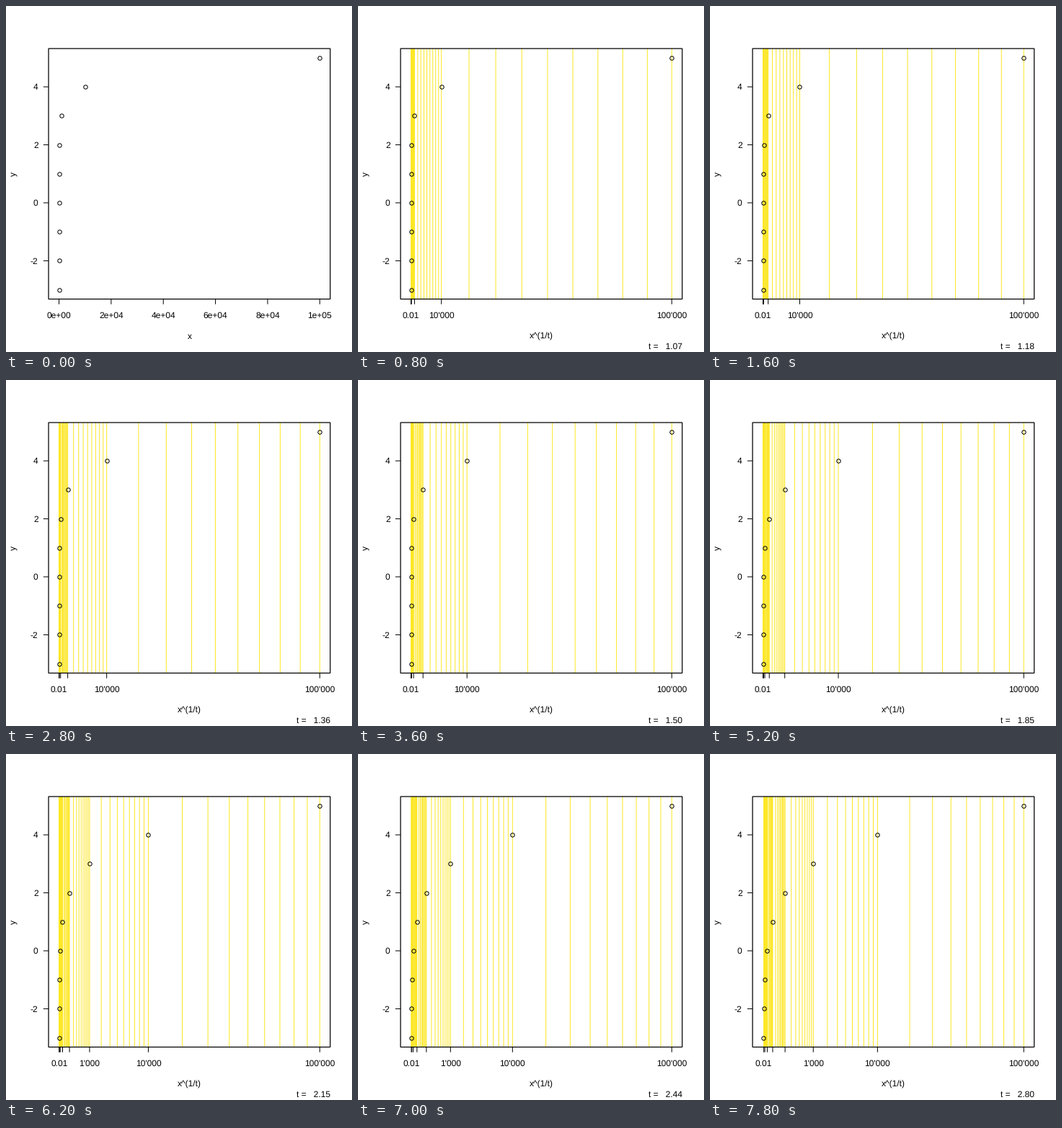
These frames come from a looping animation (480 by 480 pixels, 8000 ms). A matplotlib script:

```python
import numpy as np
import matplotlib
import matplotlib.pyplot as plt
from matplotlib.animation import FuncAnimation
from matplotlib.collections import LineCollection
from matplotlib.patches import Rectangle

SIZE, DPI = 480, 100
PX = 72 / DPI
FRAMES, STEP = 40, 200
LEFT, RIGHT, TOP, BOTTOM = 59.04, 449.76, 59.04, 406.56
TICK = 7.2
YELLOW = "#fde725"

matplotlib.rcParams.update({
    "font.family": "Liberation Sans",
    "font.size": 12 * PX,
    "text.hinting": "none",
    "path.snap": False,
    "axes.unicode_minus": False,
})

fig = plt.figure(figsize=(SIZE / DPI, SIZE / DPI), dpi=DPI, facecolor="white")
ax = fig.add_axes([0, 0, 1, 1])
ax.set_xlim(0, SIZE)
ax.set_ylim(SIZE, 0)
ax.axis("off")


def to_x(u):
    """Pixel column of u in 0..1, with a 4% margin on both sides."""
    return LEFT + (RIGHT - LEFT) * (u + 0.04) / 1.08


def to_y(v):
    return BOTTOM - (BOTTOM - TOP) * ((v + 3) / 8 + 0.04) / 1.08


def text(x, y, s="", ha="center", va="baseline", **kw):
    return ax.text(x, y, s, ha=ha, va=va, color="black", **kw)


def segments(color, width, z):
    lines = LineCollection([], colors=color, linewidths=width * PX, zorder=z)
    ax.add_collection(lines, autolim=False)
    return lines


def vertical(xs, y0, y1):
    return [[(x, y0), (x, y1)] for x in xs]


def text_width(s):
    return sum({"'": 2.29, ".": 3.33}.get(c, 6.67) for c in s)


exponents = np.arange(-3, 6)
decades = 10.0 ** np.arange(-2, 6)
names = ["0.01", "0.1", "1", "10", "100", "1'000", "10'000", "100'000"]
grid_values = np.append(np.outer(decades[:-1], np.arange(1, 10)).ravel(), 1e5)

# Fixed parts
ax.add_patch(Rectangle((LEFT, TOP), RIGHT - LEFT, BOTTOM - TOP, fill=False,
                       edgecolor="black", linewidth=1.25 * PX, zorder=4))
y_ticks = segments("black", 1, 4)
y_ticks.set_segments([[(LEFT - TICK, to_y(v)), (LEFT, to_y(v))]
                      for v in (-2, 0, 2, 4)])
for v in (-2, 0, 2, 4):
    text(LEFT - 14.4, to_y(v) + 4.3, str(v), ha="right")
text(13, (TOP + BOTTOM) / 2, "y", rotation=90, rotation_mode="anchor")

# Moving parts
grid = segments(YELLOW, 1, 1)
x_ticks = segments("black", 1, 4)
dots, = ax.plot([], [], "o", ms=5.4 * PX, mfc="none", mec="black",
                mew=1 * PX, zorder=3)
labels = [text(0, 432.6) for _ in names]
x_title = text((LEFT + RIGHT) / 2, 461.6)
t_label = text(RIGHT, 475.8, ha="right")


def power(frame):
    m = max(frame - 1, 0)
    return np.exp(0.0229 * m + 2.89e-6 * m ** 3)


def fitting(xs):
    """Indices of the labels that keep a gap, taken from left to right."""
    kept, end = [], -np.inf
    for i, (x, s) in enumerate(zip(xs, names)):
        half = text_width(s) / 2
        if x - half >= end + 10:
            kept.append(i)
            end = x + half
    return kept


def draw(frame):
    t = power(frame)

    def scale(values):
        return to_x((np.asarray(values) / 1e5) ** (1 / t))

    dots.set_data(scale(10.0 ** exponents), to_y(exponents))
    for lab in labels:
        lab.set_text("")

    if frame == 0:
        xs = to_x(np.arange(6) / 5)
        shown = [(x, f"{2e4 * i:.0e}") for i, x in enumerate(xs)]
        grid.set_segments([])
        x_title.set_text("x")
        t_label.set_text("")
    else:
        xs = scale(decades)
        shown = [(xs[i], names[i]) for i in fitting(xs)]
        grid.set_segments(vertical(scale(grid_values), TOP, BOTTOM))
        x_title.set_text("x^(1/t)")
        t_label.set_text(f"t =   {t:.2f}")

    x_ticks.set_segments(vertical(xs, BOTTOM, BOTTOM + TICK))
    for lab, (x, s) in zip(labels, shown):
        lab.set_x(x)
        lab.set_text(s)
    return [grid, x_ticks, dots, x_title, t_label, *labels]


anim = FuncAnimation(fig, draw, frames=FRAMES, interval=STEP,
                     init_func=lambda: draw(0), repeat=True, repeat_delay=0)
plt.show()
```
